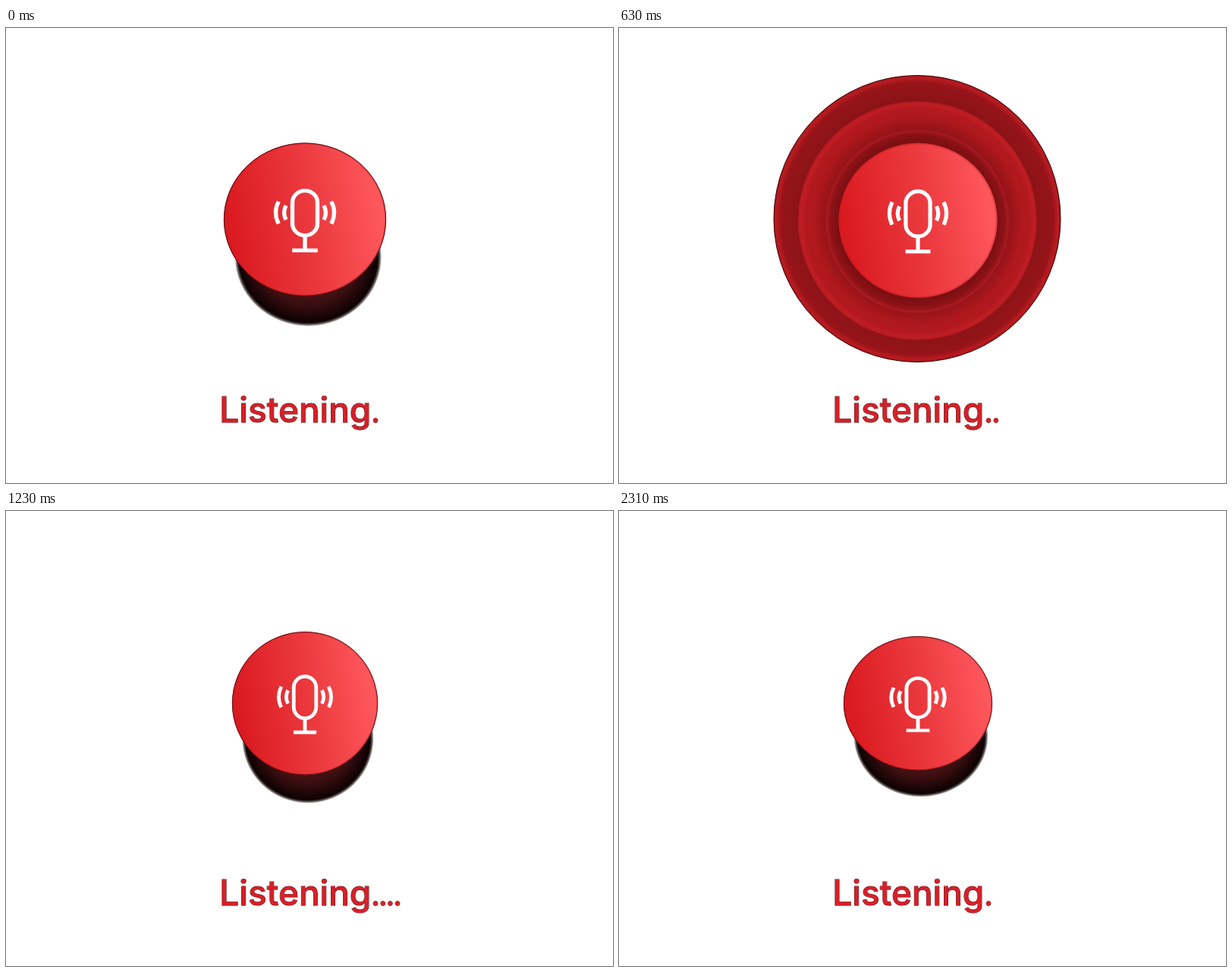
Animation of 800x600 px, one loop 2.34 s. Source, as an HTML page:

```html
<!DOCTYPE html>
<html lang="en">
<head>
<meta charset="utf-8">
<title>Listening</title>
<style>
  html, body { margin: 0; width: 100%; height: 100%; overflow: hidden; background: #fff; }
  svg { display: block; width: 800px; height: 600px; }
  text { font: 500 46px Inter, sans-serif; }
  .label { fill: #d81f27; stroke: #4a070b; stroke-width: .9; paint-order: stroke; }
  .icon { fill: none; stroke: #fff; stroke-width: 5; }
</style>
</head>
<body>
<svg viewBox="0 0 800 600">
  <defs>
    <linearGradient id="face" x1="0" y1=".58" x2="1" y2=".42">
      <stop offset=".04" stop-color="#da1b21"/>
      <stop offset=".5" stop-color="#ea373c"/>
      <stop offset="1" stop-color="#ff5a5f"/>
    </linearGradient>
    <radialGradient id="drop">
      <stop offset=".4" stop-color="#541618"/>
      <stop offset=".7" stop-color="#3a0e10"/>
      <stop offset=".95" stop-color="#0d0202"/>
      <stop offset=".97" stop-color="#0d0202" stop-opacity=".8"/>
      <stop offset="1" stop-color="#0d0202" stop-opacity=".25"/>
    </radialGradient>
    <radialGradient id="outer">
      <stop offset=".8" stop-color="#9a1419"/>
      <stop offset=".95" stop-color="#a9171c"/>
      <stop offset=".98" stop-color="#ce1e25"/>
      <stop offset="1" stop-color="#bf1b21"/>
    </radialGradient>
    <radialGradient id="middle">
      <stop offset=".75" stop-color="#bd1a20"/>
      <stop offset=".94" stop-color="#c91c22"/>
      <stop offset=".98" stop-color="#d82129"/>
      <stop offset="1" stop-color="#c01b21"/>
    </radialGradient>
    <radialGradient id="inner">
      <stop offset=".85" stop-color="#b0181d"/>
      <stop offset=".94" stop-color="#ba1a1f"/>
      <stop offset=".98" stop-color="#da222a"/>
      <stop offset="1" stop-color="#b5191e"/>
    </radialGradient>
    <radialGradient id="shade">
      <stop offset=".76" stop-color="#300" stop-opacity=".3"/>
      <stop offset="1" stop-color="#300" stop-opacity="0"/>
    </radialGradient>
    <mask id="cut" maskUnits="userSpaceOnUse" x="0" y="0" width="800" height="600">
      <rect width="800" height="600" fill="#fff"/>
      <circle id="hole" cx="393" cy="254" fill="none" stroke="#000"/>
    </mask>
  </defs>
  <rect width="800" height="600" fill="#fff"/>
  <g class="press"><circle cx="4" cy="49" r="90" fill="url(#drop)"/></g>
  <g id="rings" mask="url(#cut)">
    <circle class="ring" cx="393" cy="251.5" fill="url(#outer)" stroke="#3b0507"/>
    <circle class="ring" cx="393.3" cy="254" fill="url(#middle)"/>
    <circle class="ring" cx="393.2" cy="255" fill="url(#inner)"/>
    <circle id="halo" cx="394" cy="253" r="138" fill="url(#shade)"/>
    <circle id="dim" cx="393" cy="251.5"/>
    <g id="glint">
      <circle cx="393.2" cy="255" r="119" fill="#1c0305" opacity=".55"/>
      <path d="M281 222A118 118 0 0 1 494 196A104 104 0 0 0 300 206Q288 211 281 222Z" fill="#a39a9a"/>
      <path d="M295 272Q299 292 310 308" fill="none" stroke="#fff" stroke-width="2"/>
    </g>
  </g>
  <g class="press">
    <circle r="100" fill="url(#face)"/>
    <circle r="99" fill="none" stroke="#b8161c" stroke-width="2" opacity=".3"/>
    <circle id="edge" r="99.7" fill="none" stroke="#3b0507" stroke-width=".8"/>
    <g class="icon">
      <rect x="-15.4" y="-37.6" width="30.8" height="58.4" rx="15.4"/>
      <path d="M0 20.8V40.3M-15.7 40.3H15.7"/>
      <path d="M-32.5 -23.5Q-39.5 -9 -32.5 5.5M-23.3 -18.3Q-28 -9 -23.3 .3"/>
      <path d="M32.5 -23.5Q39.5 -9 32.5 5.5M23.3 -18.3Q28 -9 23.3 .3"/>
    </g>
  </g>
  <g class="label">
    <text x="281.3" y="519.5">Listening</text>
    <circle class="dot" cx="487" cy="517.5" r="2.9"/>
    <circle class="dot" cx="496.8" cy="517.5" r="2.9"/>
    <circle class="dot" cx="506.4" cy="517.5" r="2.9"/>
    <circle class="dot" cx="516" cy="517.5" r="2.9"/>
  </g>
</svg>
<script>
  const LOOP = 2340, STEP = 30;
  const $ = id => document.getElementById(id);
  const all = name => [...document.querySelectorAll('.' + name)];
  const clamp = v => Math.max(0, Math.min(1, v));

  const widthKeys = [[0, 107], [200, 108], [390, 107], [630, 104.5], [870, 100],
    [1230, 96], [1620, 93.4], [1950, 94], [2310, 98]];
  const heightKeys = [[0, 101], [200, 103], [390, 103.5], [630, 102], [870, 99.5],
    [1230, 94.5], [1680, 90.8], [1950, 89], [2310, 88.5]];
  const ringSizes = [189, 157.5, 122];
  const dotCounts = [1, 2, 3, 4, 3, 2, 1];

  const press = all('press'), rings = all('ring'), dots = all('dot');

  // Smooth curve through [time, value] keys
  function curve(keys, t) {
    const last = keys.length - 1;
    let i = 0;
    while (i < last - 1 && t > keys[i + 1][0]) i++;
    const slope = k => {
      const a = keys[Math.max(0, k - 1)], b = keys[Math.min(last, k + 1)];
      return (b[1] - a[1]) / (b[0] - a[0]);
    };
    const [t0, v0] = keys[i], [t1, v1] = keys[i + 1];
    const d = t1 - t0, u = clamp((t - t0) / d), w = 1 - u;
    return v0 * w * w * (1 + 2 * u) + v1 * u * u * (3 - 2 * u)
      + d * u * w * (slope(i) * w - slope(i + 1) * u);
  }

  function draw(t) {
    const rx = curve(widthKeys, t), ry = curve(heightKeys, t);
    const cy = 252.5 + 1.2 * clamp(t / 500);
    const move = `translate(394 ${cy}) scale(${rx / 100} ${ry / 100})`;
    press.forEach(g => g.setAttribute('transform', move));

    const grow = clamp((t - 30) / 540);
    const radius = size => 100 + (size - 100) * grow;
    const ringsOn = t >= 60 && t < 930;
    $('rings').style.display = ringsOn ? '' : 'none';
    rings.forEach((c, i) => c.setAttribute('r', radius(ringSizes[i])));
    $('halo').setAttribute('r', Math.min(138, radius(ringSizes[0])));
    $('dim').setAttribute('r', radius(ringSizes[0]));
    $('dim').setAttribute('opacity', clamp((t - 570) / 540));
    $('edge').style.display = ringsOn && t < 840 ? 'none' : '';

    // The fading rings break open from a thin gap outward
    const gap = t > 840 ? 7.5 * ((t - 840) / 30) ** 2 : 0;
    $('hole').setAttribute('r', 122 + gap / 2);
    $('hole').setAttribute('stroke-width', gap);
    $('glint').style.display = gap ? '' : 'none';

    const count = dotCounts[Math.min(6, Math.floor(t / 330))];
    dots.forEach((c, i) => c.style.display = i < count ? '' : 'none');
  }

  function tick() {
    const t = performance.now() % LOOP;
    draw(t < 60 ? 0 : Math.floor(t / STEP) * STEP);
    requestAnimationFrame(tick);
  }
  tick();
</script>
</body>
</html>
```
